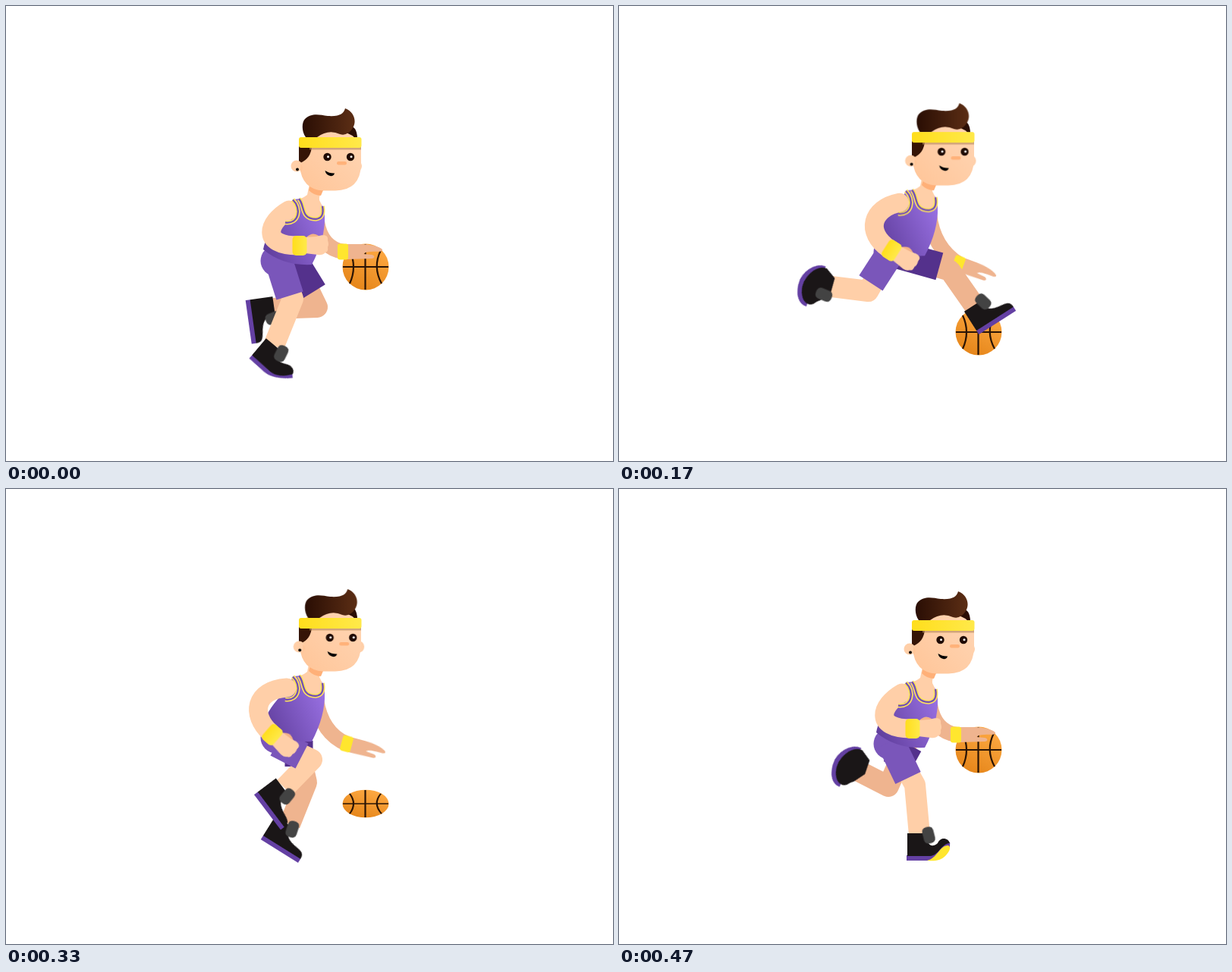
Write an HTML page without scripts that moves like this. It is 800 px wide and 600 px high and loops after 0.5 s.

```html
<!DOCTYPE html>
<html lang="en">
<head>
<meta charset="utf-8">
<title>Basketball dribble</title>
<style>
html, body { margin: 0; height: 100%; overflow: hidden; background: #fff; }
svg { display: block; width: 100%; height: 100%; }

/* Poses are held like drawn frames; longer gaps switch to three holds. */
svg * { animation: 0s steps(2) infinite; }
.leg, .shorts, .arm { fill: none; }
.leg { stroke-width: 28; stroke-linejoin: round; }
.shorts { stroke-width: 37; }
.skin { fill: #ffcfa8; }
.dark-skin { fill: #efb48f; }
.near .leg, .near.arm { stroke: #ffcfa8; }
.far .leg, .far.arm { stroke: #efb48f; }
.near .shorts { stroke: #7a56ba; }
.far .shorts { stroke: #54318c; }
.near.arm { stroke-width: 25; stroke-linecap: round; }
.far.arm { stroke-width: 20; }
.upper { fill: #1a1617; }
.sole { fill: none; stroke: #6440a3; stroke-width: 7; }
.yellow { fill: #ffe62e; }
.tongue { fill: #434343; }
.trim { fill: none; stroke: #ffe45c; stroke-width: 5.6; }
.trim + .trim { stroke: #7450b5; stroke-width: 2.4; }
.seams { fill: none; stroke: #2a1405; stroke-width: 2.2; }

.head { animation-name: head; animation-duration: .5s; }
.face { animation-name: face; animation-duration: .5s; }
.torso { animation-name: torso; animation-duration: .5s; }
.ball { animation-name: ball; animation-duration: .5s; }
.near .leg { animation-name: near-leg; animation-duration: .5s; }
.near .shorts { animation-name: near-shorts; animation-duration: .5s; }
.near .foot { animation-name: near-foot; animation-duration: .5s; }
.far .leg { animation-name: far-leg; animation-duration: .5s; }
.far .shorts { animation-name: far-shorts; animation-duration: .5s; }
.far .foot { animation-name: far-foot; animation-duration: .5s; }
.near.arm { animation-name: near-arm; animation-duration: .5s; }
.near.hand { animation-name: near-hand; animation-duration: .5s; }
.far.arm { animation-name: far-arm; animation-duration: .5s; }
.far.hand { animation-name: far-hand; animation-duration: .5s; }
.foot use, .scuff { animation-duration: .5s; animation-timing-function: step-end; }
.near .push { animation-name: show-push; }
.near .trail { animation-name: show-trail; }
.near .flat { animation-name: show-lift; }
.near .strike { animation-name: show-reach; }
.near .roll, .far .trail { animation-name: show-last; }
.near .tongue { animation-name: tongue-near; }
.far .flat { animation-name: show-flat; }
.far .strike { animation-name: show-strike; }
.far .roll { animation-name: show-roll; }
.far .tongue { animation-name: tongue-far; }
.scuff { animation-name: scuff; }

@keyframes head {
  0%, 94%, to { transform: none; }
  14% { transform: translateY(-7px); }
  26% { transform: translateY(-12px); animation-timing-function: steps(3); }
  46% { transform: translateY(3.5px); animation-timing-function: steps(3); }
  66% { transform: translateY(-3px); }
  80% { transform: translateY(-11px); }
}
@keyframes face {
  0%, 14%, 94%, to { transform: none; }
  26% { transform: translateX(.7px); animation-timing-function: steps(3); }
  46% { transform: translateX(3.2px); animation-timing-function: steps(3); }
  66% { transform: translateX(3.2px); }
  80% { transform: translateX(2.2px); }
}
@keyframes torso {
  0%, 94%, to { transform: none; }
  14% { transform: translateY(-8px); }
  26% { transform: translateY(-16px); animation-timing-function: steps(3); }
  46% { transform: translateY(-3px); animation-timing-function: steps(3); }
  66% { transform: translateY(-8px); }
  80% { transform: translateY(-13px); }
}
@keyframes ball {
  0%, 94%, to { transform: translate(474px, 344px); }
  7% { transform: translate(474px, 347px); animation-timing-function: steps(1); }
  14% { transform: translate(474px, 355px); }
  26% { transform: translate(474px, 394px); }
  40% { transform: translate(474px, 466px); animation-timing-function: steps(1); }
  46% { transform: translate(474px, 469px) scaleY(.63); animation-timing-function: steps(3); }
  66% { transform: translate(474px, 415px) scaleY(.6); }
  80% { transform: translate(474px, 360px) scaleY(.68); }
}
@keyframes near-leg {
  0% { d: path("M357 328 L378 386 L353 448"); }
  14% { d: path("M357 322 L341 384 L303 418"); }
  26% { d: path("M358 324 L317 367 L262 367"); animation-timing-function: steps(3); }
  46% { d: path("M355 330 L351 394 L300 374"); animation-timing-function: steps(3); }
  66% { d: path("M357 335 L403 357 L367 394"); }
  80% { d: path("M357 327 L412 332 L447 376"); }
  94%, to { d: path("M358 333 L390 390 L396 456"); }
}
@keyframes near-shorts {
  0% { d: path("M357 328 L374 382"); }
  14% { d: path("M357 322 L343 378"); }
  26% { d: path("M360 322 L322 360"); animation-timing-function: steps(3); }
  46% { d: path("M355 330 L352 376"); animation-timing-function: steps(3); }
  66% { d: path("M357 335 L390 352"); }
  80% { d: path("M357 328 L399 333"); }
  94%, to { d: path("M358 333 L381 381"); }
}
@keyframes near-foot {
  0% { transform: translate(352px, 446px) rotate(40deg); }
  14% { transform: translate(304px, 418px) rotate(70deg); }
  26% { transform: translate(267px, 371px) rotate(125deg); animation-timing-function: steps(3); }
  46% { transform: translate(311px, 366px) rotate(130deg); animation-timing-function: steps(3); }
  66% { transform: translate(363px, 391px) rotate(53deg); }
  80% { transform: translate(444px, 374px) rotate(-28deg); }
  94%, to { transform: translate(392px, 454px) rotate(0deg); }
}
@keyframes far-leg {
  0% { d: path("M380 335 L410 397 L352 399"); }
  14% { d: path("M375 335 L437 350 L424 411"); }
  26% { d: path("M375 330 L438 338 L479 385"); animation-timing-function: steps(3); }
  46% { d: path("M380 335 L432 370 L448 416"); }
  59% { d: path("M380 333 L412 383 L395 455"); animation-timing-function: steps(1); }
  66% { d: path("M384 335 L396 387 L374 442"); }
  80% { d: path("M378 335 L361 384 L301 384"); }
  94%, to { d: path("M380 335 L355 392 L314 371"); }
}
@keyframes far-shorts {
  0% { d: path("M378 333 L405 377"); }
  14% { d: path("M375 332 L421 347"); }
  26% { d: path("M366 326 L424 334"); animation-timing-function: steps(3); }
  46% { d: path("M380 335 L419 362"); }
  59% { d: path("M382 335 L402 370"); animation-timing-function: steps(1); }
  66% { d: path("M386 332 L386 366"); }
  80% { d: path("M378 340 L366 369"); }
  94%, to { d: path("M382 337 L365 368"); }
}
@keyframes far-foot {
  0% { transform: translate(353px, 395px) rotate(82deg); }
  14% { transform: translate(417px, 409px) rotate(17deg); }
  26% { transform: translate(475px, 387px) rotate(-40deg); animation-timing-function: steps(3); }
  46% { transform: translate(445px, 415px) rotate(-18deg); }
  59% { transform: translate(390px, 453px) rotate(6deg); animation-timing-function: steps(1); }
  66% { transform: translate(365px, 438px) rotate(32deg); }
  80% { transform: translate(303px, 375px) rotate(97deg); }
  94%, to { transform: translate(327px, 368px) rotate(130deg); }
}
@keyframes near-arm {
  0%, 94%, to { d: path("M373 269 C345 285 335 316 385 316"); }
  14% { d: path("M372 262 C341 278 331 308 378 317"); }
  26% { d: path("M369 255 C336 265 326 300 362 319"); animation-timing-function: steps(3); }
  46% { d: path("M371 268 C326 270 321 295 343 322"); animation-timing-function: steps(3); }
  66% { d: path("M370 262 C327 265 323 298 348 321"); }
  80% { d: path("M370 259 C340 275 330 305 372 318"); }
}
@keyframes near-hand {
  0%, 94%, to { transform: translate(387px, 316px); }
  14% { transform: translate(381px, 318px) rotate(6deg); }
  26% { transform: translate(366px, 321px) rotate(27deg); animation-timing-function: steps(3); }
  46% { transform: translate(346px, 325px) rotate(44deg); animation-timing-function: steps(3); }
  66% { transform: translate(351px, 324px) rotate(41deg); }
  80% { transform: translate(374px, 319px) rotate(12deg); }
}
@keyframes far-arm {
  0%, 94%, to { d: path("M410 285 Q416 320 445 324"); }
  14% { d: path("M409 278 Q416 314 445 324"); }
  26% { d: path("M409 270 Q414 314 447 337"); animation-timing-function: steps(3); }
  46% { d: path("M409 284 Q414 328 449 346"); animation-timing-function: steps(3); }
  66% { d: path("M409 278 Q416 322 449 336"); }
  80% { d: path("M409 272 Q418 314 448 320"); }
}
@keyframes far-hand {
  0%, 94%, to { transform: translate(444px, 324px); }
  14% { transform: translate(445px, 324px) rotate(5deg); }
  26% { transform: translate(447px, 337px) rotate(22deg); animation-timing-function: steps(3); }
  46% { transform: translate(448px, 346px) rotate(17deg); animation-timing-function: steps(3); }
  66% { transform: translate(449px, 336px) rotate(15deg); }
  80% { transform: translate(448px, 320px) rotate(8deg); }
}
@keyframes show-push { 0% { opacity: 1; } 26%, to { opacity: 0; } }
@keyframes show-trail { 0%, 66%, to { opacity: 0; } 26% { opacity: 1; } }
@keyframes show-lift { 0%, 80%, to { opacity: 0; } 66% { opacity: 1; } }
@keyframes show-reach { 0%, 94%, to { opacity: 0; } 80% { opacity: 1; } }
@keyframes show-last { 0% { opacity: 0; } 94%, to { opacity: 1; } }
@keyframes show-flat { 0%, 66% { opacity: 1; } 46%, 94%, to { opacity: 0; } }
@keyframes show-strike { 0%, 59%, to { opacity: 0; } 46% { opacity: 1; } }
@keyframes show-roll { 0%, 66%, to { opacity: 0; } 59% { opacity: 1; } }
@keyframes tongue-near { 0%, 60%, to { opacity: 1; } 40% { opacity: 0; } }
@keyframes tongue-far { 0% { opacity: 1; } 94%, to { opacity: 0; } }
@keyframes scuff { 0%, 53%, to { opacity: 0; } 46% { opacity: 1; } }
</style>
</head>
<body>
<svg viewBox="0 0 800 600">
  <defs>
    <linearGradient id="hair"><stop stop-color="#2a0e04"/><stop offset="1" stop-color="#5c2e15"/></linearGradient>
    <linearGradient id="gold"><stop stop-color="#ffde1c"/><stop offset="1" stop-color="#ffe94a"/></linearGradient>
    <linearGradient id="jersey" x1="0" y1=".8" x2="1" y2=".3"><stop stop-color="#5f3d9b"/><stop offset="1" stop-color="#9870e2"/></linearGradient>
    <linearGradient id="cheek" x1="0" y1="1" x2="1" y2="0"><stop stop-color="#ffc598"/><stop offset="1" stop-color="#ffd6b5"/></linearGradient>
    <linearGradient id="leather" x1=".8" y1="0" x2=".3" y2="1"><stop stop-color="#ffab45"/><stop offset="1" stop-color="#e58519"/></linearGradient>

    <g id="flat">
      <path class="sole" d="M-12 32.5 H46"/>
      <path class="upper" d="M-12 0 H12 C13 16 22 18 36 20 C44 21 46 24 46 30 H-12Z"/>
    </g>
    <g id="push">
      <path class="sole" d="M-12 31 L14 32 C26 32 36 25 46 15"/>
      <path class="upper" d="M-12 0 H12 C13 14 20 14 30 9 C38 5 45 9 45 14 C38 24 30 30 20 30 L-12 29Z"/>
    </g>
    <g id="trail">
      <path class="sole" d="M-12 22 C-9 34 10 41 25 34 C36 29 42 21 39 13"/>
      <path class="upper" d="M-10 4 L-14 20 C-11 33 10 38 24 32 C36 27 42 16 37 9 C34 5 30 6 25 2 L8 -3Z"/>
    </g>
    <g id="strike">
      <path class="sole" d="M-16 29 L0 30 C14 29 26 17 39 21"/>
      <path class="upper" d="M-12 0 H12 C14 14 18 13 28 11 C38 10 40 16 38 18 C26 18 14 27 4 28 L-16 27Z"/>
      <path class="yellow" d="M-14 40 C-16 33 -8 33 0 33 C14 32 20 22 32 21 C44 20 46 30 36 37 C24 46 8 49 -6 47 Q-14 46 -14 40"/>
    </g>
    <g id="roll">
      <path class="sole" d="M-13 32.5 H14 C28 33 32 15 44 16"/>
      <path class="upper" d="M-12 0 H12 C14 16 20 20 28 13 C32 4 42 6 44 13 C32 14 30 29 18 30 H-12Z"/>
      <path class="yellow" d="M14 36 C28 33 30 16 42 16 C46 18 44 24 38 30 C32 36 24 37 14 36"/>
    </g>
    <rect id="tongue" x="8.500" y="-8.500" width="15" height="22" rx="6" transform="rotate(-14 16 2)"/>
  </defs>

  <ellipse class="scuff" cx="443.5" cy="491.5" rx="3.2" ry="1.6" fill="#7450b5" transform="rotate(-15 443.5 491.5)"/>

  <g class="ball">
    <circle r="30.5" fill="url(#leather)"/>
    <path class="seams" d="M-30 0 H30 M-.5 -30 V30 M-21 -22 Q-11 0 -21 22 M20 -22 Q9 0 21 22"/>
  </g>

  <path class="far arm"/>
  <g class="far hand">
    <path class="dark-skin" d="M5 -10 H22 C36 -10 48 -7 52 -3 C53 2 44 -2 30 1 L27 3 L38 4 C43 5 42 9 38 9 L5 10Z"/>
    <rect class="yellow" x="-7" y="-10.500" width="14" height="21" rx="3"/>
  </g>

  <g class="far">
    <path class="leg"/>
    <path class="shorts"/>
    <g class="foot">
      <use class="flat" href="#flat"/><use class="trail" href="#trail"/>
      <use class="strike" href="#strike"/><use class="roll" href="#roll"/>
      <use class="tongue" href="#tongue"/>
    </g>
  </g>

  <g class="near">
    <path class="leg"/>
    <circle class="torso" cx="356" cy="336" r="20.500" fill="#7a56ba"/>
    <path class="shorts"/>
    <g class="foot">
      <use class="push" href="#push"/><use class="trail" href="#trail"/>
      <use class="flat" href="#flat"/><use class="strike" href="#strike"/>
      <use class="roll" href="#roll"/><use class="tongue" href="#tongue"/>
    </g>
  </g>

  <g class="torso">
    <path class="skin" d="M376 257 Q390 255 397 249 L402 225 H418 V243 Q412 250 413 256 L417 264 V281 H390Z"/>
    <path d="M379 255 L389 254 C391 272 396 281 408 281 C418 281 420 274 416 262 Q420 266 420 277 Q421 307 403 341 Q365 343 339 321 Q342 302 362 281Z" fill="url(#jersey)"/>
  </g>

  <g class="head">
    <path d="M401 236 H418 V243 L415 250 Q406 250 399 243Z" fill="#ffb078"/>
    <g class="face">
      <ellipse class="skin" cx="462" cy="211" rx="7" ry="7.500"/>
    </g>
    <path d="M448 158 Q463 156 463 175 H448Z" fill="#2a0e04"/>
    <path d="M388 180 Q400 165 425 165 Q450 163 461 175 L468 184 V209 Q467 243 434 243.500 H418 Q390 242 387 211Z" fill="url(#cheek)"/>
    <path d="M386 185 H403 Q402 201 388 207 L386 206Z" fill="#351406"/>
    <g class="face">
      <circle class="skin" cx="383" cy="211" r="7.500"/>
      <path d="M388 208 Q394 212 388 219Z" fill="#ffc598"/>
      <circle cx="384" cy="215.500" r="1.900"/>
      <g fill="#1f0b04"><circle cx="423.500" cy="199" r="5.200"/><circle cx="454" cy="199" r="5.200"/></g>
      <g fill="#fff"><circle cx="424.500" cy="198.700" r="1.500"/><circle cx="455" cy="198.700" r="1.500"/></g>
      <rect x="436" y="205" width="13" height="4.500" rx="2.200" fill="#ffb27a"/>
      <path d="M420.500 217 Q426.500 221 433 220.500 Q432 224.500 428 224.300 Q421.500 223 420.500 217"/>
    </g>
    <path class="face" d="M447 135 C458 139 463 151 457 161 Q450 172 440 169 Q425 162 410 173 H395 C389 164 390 153 394 149 C402 141 412 143 424 145 C440 146 445 142 447 135" fill="url(#hair)"/>
    <path d="M400 186 H468 V189.500 H400Z" fill="#b98d62" opacity=".65"/>
    <rect x="386" y="173" width="82.500" height="14" rx="3" fill="url(#gold)"/>
  </g>

  <path class="near arm"/>
  <g class="near hand">
    <path d="M9 -11 Q17 -19 25 -13 L22 -5 H9Z" fill="#f3b287"/>
    <path class="skin" d="M7 -11 L22 -12 C34 -16 38 -13 37 -7 Q39 -2 37 2 Q38 8 34 9 Q30 13 24 12 L7 10Z"/>
    <rect x="-9.500" y="-13" width="19" height="26" rx="5" fill="url(#gold)"/>
  </g>

  <g class="torso">
    <path class="trim" d="M378 255.500 C390 267 386 288 368 285.500"/>
    <path class="trim" d="M378 255.500 C390 267 386 288 368 285.500"/>
    <g>
      <path class="trim" d="M386 254.500 C394 262 388 281 408 281 Q420 280 417 264"/>
      <path class="trim" d="M386 254.500 C394 262 388 281 408 281 Q420 280 417 264"/>
    </g>
  </g>
</svg>
</body>
</html>
```
